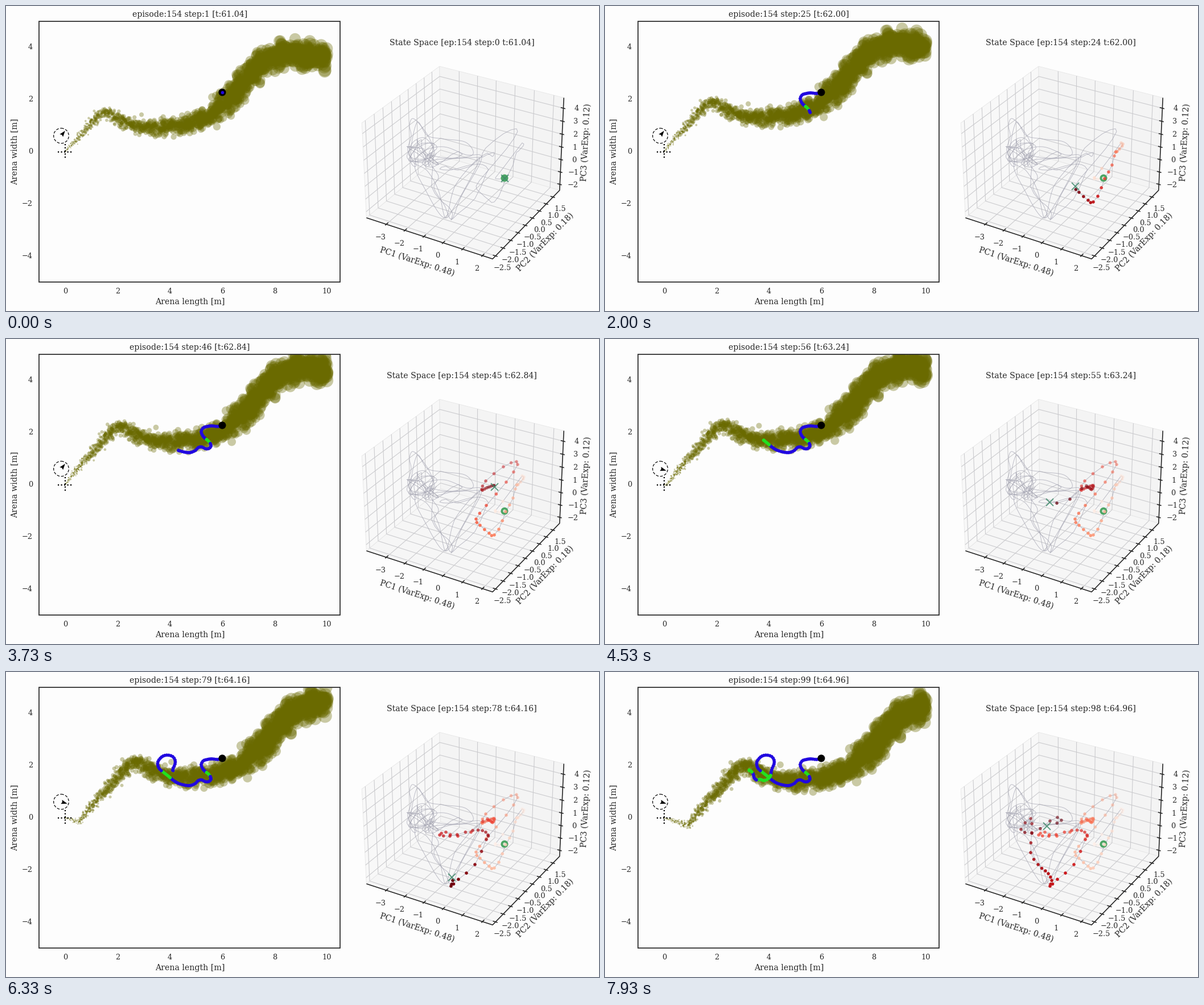
A matplotlib script for the animation above (8000 ms loop, 1042 px wide and 537 px high).

```python
import numpy as np
import matplotlib.pyplot as plt
from matplotlib.animation import FuncAnimation
from matplotlib.collections import LineCollection
from matplotlib.patches import Circle, Polygon, Rectangle

W, H = 1042, 537
PT = 0.72                     # points per pixel at 100 dpi
FRAMES, LOOP = 120, 8000
INK = "#262626"
BLUE, GREEN = (0.13, 0.03, 0.88), (0.13, 0.88, 0.12)
TURN = 2.01                   # seconds until the wind veers

plt.rcParams["font.family"] = "DejaVu Serif"
fig = plt.figure(figsize=(W / 100, H / 100), dpi=100, facecolor="#fdfdfd")
ax = fig.add_axes([0, 0, 1, 1])
ax.set(xlim=(0, W), ylim=(H, 0))
ax.axis("off")
ax.autoscale(False)


def hermite(t, p, x):
    """Smooth curve through the points p at times t, read at x."""
    m = np.gradient(p, t, axis=0)
    i = np.clip(np.searchsorted(t, x, "right") - 1, 0, len(t) - 2)
    h = (t[i + 1] - t[i])[:, None]
    u = (x - t[i])[:, None] / h
    return ((2 * u**3 - 3 * u**2 + 1) * p[i] + (u**3 - 2 * u**2 + u) * h * m[i]
            + (3 * u**2 - 2 * u**3) * p[i + 1] + (u**3 - u**2) * h * m[i + 1])


def smooth(points, per=12):
    p = np.array(points, float)
    t = np.arange(len(p), dtype=float)
    return hermite(t, p, np.linspace(0, len(p) - 1, per * len(p)))


def keyed(rows):
    rows = np.array(rows, float)
    return hermite(rows[:, 0], rows[:, 1:], np.arange(100.0))


def label(x, y, s, size=14.1, rot=0, ha="center"):
    return ax.text(x, y, s, size=size * PT, color=INK, rotation=rot, ha=ha,
                   va="center", zorder=6)


def num(v, digits=0):
    return f"{v:.{digits}f}".replace("-", "\u2212")


def dots(radius, z, **kw):
    return ax.scatter([], [], s=(2 * radius * PT)**2, lw=0, zorder=z, **kw)


# ---- arena ----
frame = ax.add_patch(Rectangle((58, 26.5), 529, 459.5, fill=False, ec=INK,
                               lw=1.7 * PT, zorder=8))
for v in range(0, 11, 2):
    label(104 + 46 * v, 503, num(v), 12.9)
for v in range(-4, 5, 2):
    label(47, 256.5 - 46 * v, num(v), 12.9, ha="right")
label(323, 521, "Arena length [m]")
label(15, 256.5, "Arena width [m]", rot=90)
arena_title = label(323, 15, "")

for dx, dy in ((13.5, 0), (0, 13.5)):
    ax.plot([104 - dx, 104 + dx], [256.5 - dy, 256.5 + dy], color="k",
            lw=2.2 * PT, ls=(0, (1, 1.5)), zorder=4)
ax.add_patch(Circle((97, 228.5), 13.3, fill=False, ec="k", lw=1.2 * PT,
                    ls=(0, (4, 2.2)), zorder=4))
arrow = ax.add_patch(Polygon([[0, 0]] * 4, fc="k", lw=0, zorder=5))

# ---- plume ----
rng = np.random.default_rng(7)
spine = smooth([(104, 256.5), (138, 220), (172, 188), (198, 200), (225, 211),
                (260, 214), (300, 211), (335, 204), (360, 192), (385, 170),
                (410, 145), (435, 115), (460, 94), (485, 86), (515, 88),
                (545, 90), (575, 92)])
arc = np.r_[0, np.cumsum(np.hypot(*np.diff(spine, axis=0).T))]
SPEED, RATE = 23.0, 70
birth = np.arange(-arc[-1] / SPEED, 3.96, 1 / RATE)
spread = rng.normal(size=(len(birth), 2))


def drift(t):
    t = np.asarray(t, float)
    early, late = np.minimum(t, TURN), np.maximum(t - TURN, 0)
    return np.stack([14.3 * early + 22 * late, -18.4 * early + 7.4 * late], -1)


back = np.maximum(-birth, 0) * SPEED
origin = np.stack([np.interp(back, arc, spine[:, k]) for k in (0, 1)], -1)
origin -= drift(np.maximum(birth, 0))


def plume(t):
    age = t - birth
    live = age >= 0
    age = age[live]
    pos = origin[live] + drift(t) + 2.2 * np.sqrt(age)[:, None] * spread[live]
    keep = pos[:, 0] < 564
    radius = 0.6 + 0.46 * age
    return pos[keep], (2 * PT * radius[keep])**2


puffs = dots(1, 2, color="#6a6a00", alpha=0.35)
puffs.set_clip_path(frame)

# ---- agent path ----
path = keyed([
    (0, 380, 152), (3, 372, 154), (6, 362, 153), (9, 354, 154), (12, 346, 157),
    (14, 343, 163), (16, 345, 169), (19, 350, 175), (21, 355, 179),
    (23, 359, 184), (25, 360, 189), (27, 356, 193), (29, 350, 193),
    (31, 344, 190), (33, 338, 191), (35, 333, 196), (37, 327, 199),
    (39, 322, 200), (42, 313, 199), (45, 303, 196), (49, 293, 190),
    (52, 286, 184), (56, 276, 176), (58, 270, 171), (60, 267, 165),
    (62, 267, 158), (64, 271, 152), (66, 276, 148), (69, 286, 146.5),
    (71, 293, 149), (73, 297, 155), (75, 297, 162), (77, 294, 169),
    (79, 292, 176), (81, 291, 182), (83, 288, 187), (85, 281, 191),
    (88, 272, 189), (90, 266, 190), (92, 262, 186), (94, 261, 181),
    (96, 258, 176), (99, 251, 171)])
on_odor = np.zeros(100, bool)
for a, b in ((20, 22), (51, 56), (81, 89), (96, 99)):
    on_odor[a:b + 1] = True
path_rgb = np.where(on_odor[:, None], GREEN, BLUE)
trail = dots(2.9, 5)
ax.add_patch(Circle(path[0], 6.5, fc="k", lw=0, zorder=6))
agent = dots(2.9, 7)

# ---- state space box ----
MID = np.array([-0.79, -0.345, 1.152])
HALF = np.array([3.294, 2.345, 3.639])
BOX = np.array([0.5953, 0.5953, 0.4464])
VIEW = np.array([[0.866, 0.5, 0], [-0.25, 0.433, 0.866], [0.433, -0.75, 0.5]])


def project(*p):
    """Unit-cube points to pixels, seen from elevation 30, azimuth -60."""
    u, v, w = VIEW @ (np.array(p, float) * BOX).T
    return np.stack([806.2 + 2133 * u / (10 - w), 267.6 - 2133 * v / (10 - w)], -1)


panes = (("#f8f8f8", ((-1, -1, -1), (-1, 1, -1), (-1, 1, 1), (-1, -1, 1))),
         ("#f4f4f4", ((-1, 1, -1), (1, 1, -1), (1, 1, 1), (-1, 1, 1))),
         ("#f6f6f6", ((-1, -1, -1), (1, -1, -1), (1, 1, -1), (-1, 1, -1))))
for shade, corners in panes:
    ax.add_patch(Polygon(project(*corners), fc=shade, ec="#e6e6e6", lw=0.8 * PT))

ticks = (np.arange(-3, 3), np.arange(-2.5, 1.6, 0.5), np.arange(-2, 5))
offsets = ((-10, 23), (12.5, 21.5), (23, 1))
decimals = (0, 1, 0)
grid, marks = [], []
for axis, values in enumerate(ticks):
    for v in values:
        s = (v - MID[axis]) / HALF[axis]
        if axis == 0:
            grid.append(project((s, -1, -1), (s, 1, -1), (s, 1, 1)))
            at, mark = (s, -1, -1), ((s, -1.03, -1), (s, -0.95, -1))
        elif axis == 1:
            grid.append(project((1, s, -1), (-1, s, -1), (-1, s, 1)))
            at, mark = (1, s, -1), ((1.03, s, -1), (0.96, s, -1))
        else:
            grid.append(project((-1, -1, s), (-1, 1, s), (1, 1, s)))
            at, mark = (1, 1, s), ((1.03, 1, s), (0.96, 1, s))
        marks.append(project(*mark))
        x, y = project(at)[0] + offsets[axis]
        label(x, y, num(v, decimals[axis]), 12.9)
ax.add_collection(LineCollection(grid, colors="#cbcbce", lw=1.1 * PT, zorder=1.5))
marks.append(project((-1, -1, -1), (1, -1, -1), (1, 1, -1), (1, 1, 1)))
ax.add_collection(LineCollection(marks, colors=INK, lw=1.6 * PT, zorder=1.6))
label(722, 450, "PC1 (VarExp: 0.48)", rot=-17.9)
label(947, 416, "PC2 (VarExp: 0.18)", rot=46)
label(1019, 240, "PC3 (VarExp: 0.12)", rot=87.2)
state_title = label(801, 65, "")

# ---- state trajectory ----
state = keyed([
    (0, 876, 303), (2, 860, 304), (4, 873, 286), (5, 907, 241), (6, 910, 243),
    (9, 900, 256), (12, 895, 264), (13, 891, 280), (15, 878, 304),
    (17, 866, 335), (18, 858, 345), (20, 849, 342), (22, 833, 328),
    (24, 826, 317), (26, 844, 293), (28, 879, 252), (30, 899, 221),
    (31, 897, 216), (33, 874, 225), (35, 843, 250), (37, 836, 265),
    (40, 845, 262), (44, 858, 258), (47, 855, 265), (50, 848, 261),
    (52, 838, 263), (53, 817, 282), (54, 794, 289), (56, 773, 282),
    (58, 762, 287), (60, 780, 289), (63, 820, 279), (66, 843, 282),
    (67, 847, 287), (69, 844, 295), (71, 824, 339), (73, 795, 365),
    (75, 782, 377), (77, 785, 367), (79, 779, 355), (82, 761, 339),
    (84, 748, 318), (86, 750, 283), (88, 748, 258), (90, 731, 277),
    (92, 750, 284), (95, 795, 256), (96, 802, 261), (99, 757, 276)])
tangle = smooth([
    (836, 266), (800, 268), (760, 270), (722, 275), (706, 255), (712, 230),
    (709, 210), (715, 198), (730, 212), (745, 235), (752, 262), (725, 270),
    (708, 262), (715, 240), (735, 232), (750, 250), (745, 275), (760, 300),
    (752, 320), (770, 350), (783, 375), (800, 335), (836, 268), (808, 262),
    (770, 248), (735, 255), (718, 280), (735, 320), (768, 372), (790, 350),
    (833, 268), (790, 315), (773, 373), (760, 325), (740, 290), (712, 268),
    (722, 205), (740, 228), (768, 234), (808, 240), (820, 262), (780, 268),
    (740, 262)], 8)
k = np.linspace(0, 10 * np.pi, 240)
loops = np.stack([732 + 20 * np.cos(k) + 8 * np.cos(2.7 * k + 1),
                  259 + 17 * np.sin(1.3 * k) + 7 * np.sin(2.1 * k)], -1)
ax.add_collection(LineCollection([state, tangle, loops], colors="#a4a4b2",
                                 lw=0.9 * PT, alpha=0.75, zorder=2))
ax.add_patch(Circle(state[0], 6.5, fc="#4ba564", lw=0, zorder=3))
visited = dots(2.8, 4)
head, = ax.plot([], [], "x", color="#3f8a6b", ms=13 * PT, mew=1.9 * PT,
                alpha=0.85, zorder=5)
nearness = np.clip(0.45 + (state[:, 1] - 215) / 250, 0.45, 1)


def update(i):
    s = max(0, (5 * i - 1) // 6)
    t = 0.04 * s
    stamp = f"t:{61.04 + t:.2f}]"
    arena_title.set_text(f"episode:154 step:{s + 1} [{stamp}")
    state_title.set_text(f"State Space [ep:154 step:{s} {stamp}")

    pos, sizes = plume(t)
    puffs.set_offsets(pos)
    puffs.set_sizes(sizes)

    a = np.radians(52 if t < TURN else -17)
    ahead, side = np.array([np.cos(a), -np.sin(a)]), np.array([np.sin(a), np.cos(a)])
    hub = np.array([97, 228.5])
    arrow.set_xy([hub + f * ahead + w * side
                  for f, w in ((11.2, 0), (0.5, 3.7), (2, 0), (0.5, -3.7))])

    trail.set_offsets(path[:s + 1])
    trail.set_facecolors(path_rgb[:s + 1])
    agent.set_offsets(path[s:s + 1])
    agent.set_facecolors(path_rgb[s:s + 1])

    rgba = plt.cm.Reds(np.arange(s) / max(s - 1, 1))
    rgba[:, 3] = nearness[:s]
    visited.set_offsets(state[:s])
    visited.set_facecolors(rgba)
    head.set_data(state[s:s + 1, 0], state[s:s + 1, 1])
    return []


anim = FuncAnimation(fig, update, frames=FRAMES, interval=LOOP / FRAMES,
                     repeat=True, repeat_delay=0, blit=False)
plt.show()
```
